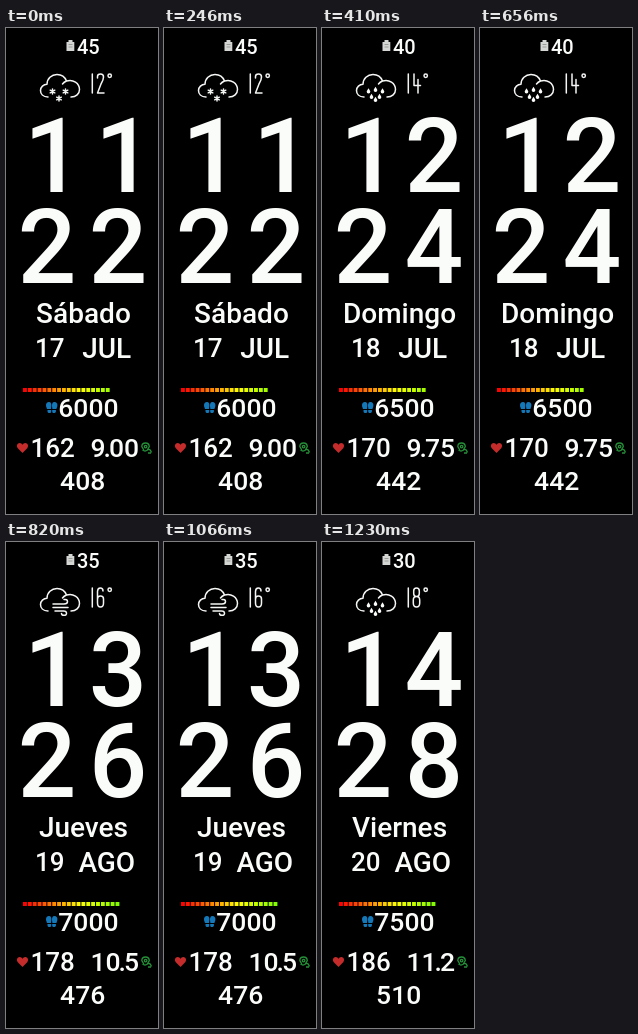
An HTML page for the animation above (1640 ms loop, 152 by 486 pixels).

```html
<!DOCTYPE html>
<html lang="es">
<head>
<meta charset="utf-8">
<title>Watch face</title>
<style>
html, body { margin: 0; width: 100%; height: 100%; overflow: hidden; background: #000; }
svg { display: block; width: 152px; height: 486px; }
text { font: 500 26.5px Roboto, sans-serif; fill: #fafcfa; }
.mid { text-anchor: middle; }
.end { text-anchor: end; }
.big { font-size: 103px; }
.date { font-size: 28px; }
.tight { font-size: 26px; }
.small { font-size: 20px; }
.line { fill: none; stroke: #f4f6f4; stroke-width: 1.5; stroke-linecap: round; stroke-linejoin: round; }
.state { visibility: hidden; animation: show 1640ms step-end infinite; }
@keyframes show {
  0% { visibility: visible; }
  25%, 100% { visibility: hidden; }
}
</style>
</head>
<body>
<svg viewBox="0 0 152 486">
  <defs>
    <linearGradient id="heat" gradientUnits="userSpaceOnUse" x1="19" x2="114" y1="0" y2="0">
      <stop offset="0" stop-color="#f00"/>
      <stop offset=".58" stop-color="#ff0"/>
      <stop offset="1" stop-color="#7cfc00"/>
    </linearGradient>
    <path id="cloud" class="line" d="M42 69C37 69 34.5 66 34.5 62.5C34.5 59 37.5 56.3 41 56.3C41 50.5 45.5 46.5 51 46.5C55.5 46.5 59 49 60.5 53C67 51 73.5 55 73.5 61.5C73.5 66 70 69 65 69M60.5 53Q58 54 56.5 56"/>
    <path id="flake" class="line" stroke-width="1.8" d="M0-2.5V2.5M-2.3-1.3L2.3 1.3M-2.3 1.3L2.3-1.3"/>
    <path id="drop" fill="#fafcfa" d="M0-2.8C.8-1.3 1.8-.4 1.8.8A1.8 1.8 0 0 1-1.8.8C-1.8-.4-.8-1.3 0-2.8Z"/>
    <g id="print">
      <path d="M40 378C39.8 375.5 41 374 43 374C45 374 45.5 376 45.4 378L45 381H41Z"/>
      <path d="M41.5 382H45.2V383.4C45.2 385.4 41.8 385.4 41.5 383.4Z"/>
    </g>
  </defs>

  <g fill="#d4d6d4">
    <path d="M62.5 12H66.5V14H68.3V23H60.5V14H62.5Z"/>
    <path d="M62.5 16.5H66.5M62.5 19H66.5" stroke="#8c8e8c" stroke-width=".8"/>
  </g>
  <g fill="#1478b8">
    <use href="#print"/>
    <use href="#print" transform="matrix(-1 0 0 1 91.4 0)"/>
  </g>
  <path fill="#c42c2c" d="M16.5 425L11.8 420.2C10 418 11.3 415 13.8 415Q15.6 415 16.5 416.7Q17.4 415 19.2 415C21.7 415 23 418 21.2 420.2Z"/>
  <g fill="none" stroke="#249038" stroke-width="1.3">
    <path d="M137.8 422L135.8 418.5Q136 415 139.5 415T143.3 418.5L141.3 422"/>
    <circle cx="139.6" cy="418.6" r="1.3"/>
    <path d="M136.5 422Q139 424 141.5 422T145.5 424.5M142 425H145"/>
  </g>
  <g id="states"></g>
</svg>
<script>
const states = [
  { battery: 45, temp: 2, sky: 'snow', hour: '11', minute: '22', weekday: 'Sábado', day: 17, month: 'JUL', steps: 6000, bars: 18, pulse: 162, km: '9.00', kcal: 408 },
  { battery: 40, temp: 4, sky: 'rain', hour: '12', minute: '24', weekday: 'Domingo', day: 18, month: 'JUL', steps: 6500, bars: 18, pulse: 170, km: '9.75', kcal: 442 },
  { battery: 35, temp: 6, sky: 'wind', hour: '13', minute: '26', weekday: 'Jueves', day: 19, month: 'AGO', steps: 7000, bars: 20, pulse: 178, km: '10.5', kcal: 476 },
  { battery: 30, temp: 8, sky: 'rain', hour: '14', minute: '28', weekday: 'Viernes', day: 20, month: 'AGO', steps: 7500, bars: 20, pulse: 186, km: '11.2', kcal: 510 }
];

const thinDigits = {
  2: 'M91.5 50V48.5Q91.5 46 94.5 46T97.5 49Q97.5 52 95 56L91.5 65H98',
  4: 'M92 46V57.5H98.5M96 51.5V65',
  6: 'M97 49Q97 46 94.3 46T91.5 49.5V61Q91.5 65 94.5 65T97.5 61V57Q97.5 54 94.5 54T91.5 57',
  8: 'M94.5 46Q91.7 46 91.7 49V51.5Q91.7 54.5 94.5 54.5T97.3 51.5V49Q97.3 46 94.5 46M94.5 54.5Q91.3 54.5 91.3 58V61Q91.3 65 94.5 65T97.7 61V58Q97.7 54.5 94.5 54.5'
};

const text = (x, y, value, style = '') => `<text x="${x}" y="${y}" class="${style}">${value}</text>`;
const line = d => `<path class="line" d="${d}"/>`;
const scatter = (shape, points) =>
  points.map(([x, y]) => `<use href="#${shape}" x="${x}" y="${y}"/>`).join('');

const skies = {
  snow: scatter('flake', [[46.5, 63.5], [59.5, 63.5], [53, 70.5]]),
  rain: scatter('drop', [[46.5, 63], [53.5, 61.5], [60.5, 63], [49.5, 68.5], [57.5, 68.5], [53.5, 71.5]]),
  wind: line('M47 62H58Q61.5 62 61.5 59.5T58 57.5M47 65.5H62M49 69H57.5Q60.5 69 60.5 71.2T58 73.3Q55.5 73.3 55.5 71.5')
};

// The narrow "1" is optically centred in its cell.
const bigDigits = (digits, y) => [...digits].map((digit, i) =>
  text(41 + i * 71 + (digit === '1' ? 6.3 : 0), y, digit, 'big mid')).join('');

const distance = km => {
  const [whole, part] = km.split('.');
  return `${whole}<tspan dx="-2">.</tspan><tspan dx="-2">${part}</tspan>`;
};

const draw = (s, i) => `<g class="state" style="animation-delay:${(i - states.length) * 410}ms">
  ${text(71, 26, s.battery, 'small')}
  <use href="#cloud"/>${skies[s.sky]}
  ${line('M86.3 46V65' + thinDigits[s.temp])}
  <circle class="line" cx="103.7" cy="47.7" r="1.7"/>
  ${bigDigits(s.hour, 164)}
  ${bigDigits(s.minute, 255)}
  ${text(77.5, 295, s.weekday, 'date mid')}
  ${text(43.7, 329, s.day, 'tight mid')}
  ${text(100.8, 330, s.month, 'date mid')}
  <path d="M17 362h${s.bars * 4.87 - 1}" stroke="url(#heat)" stroke-width="4" stroke-dasharray="3.87 1"/>
  ${text(52.3, 389, s.steps)}
  ${text(24.5, 429, s.pulse, 'tight')}
  ${text(133, 429, distance(s.km), 'end')}
  ${text(76.7, 462, s.kcal, 'mid')}
</g>`;

document.getElementById('states').innerHTML = states.map(draw).join('');
</script>
</body>
</html>
```
